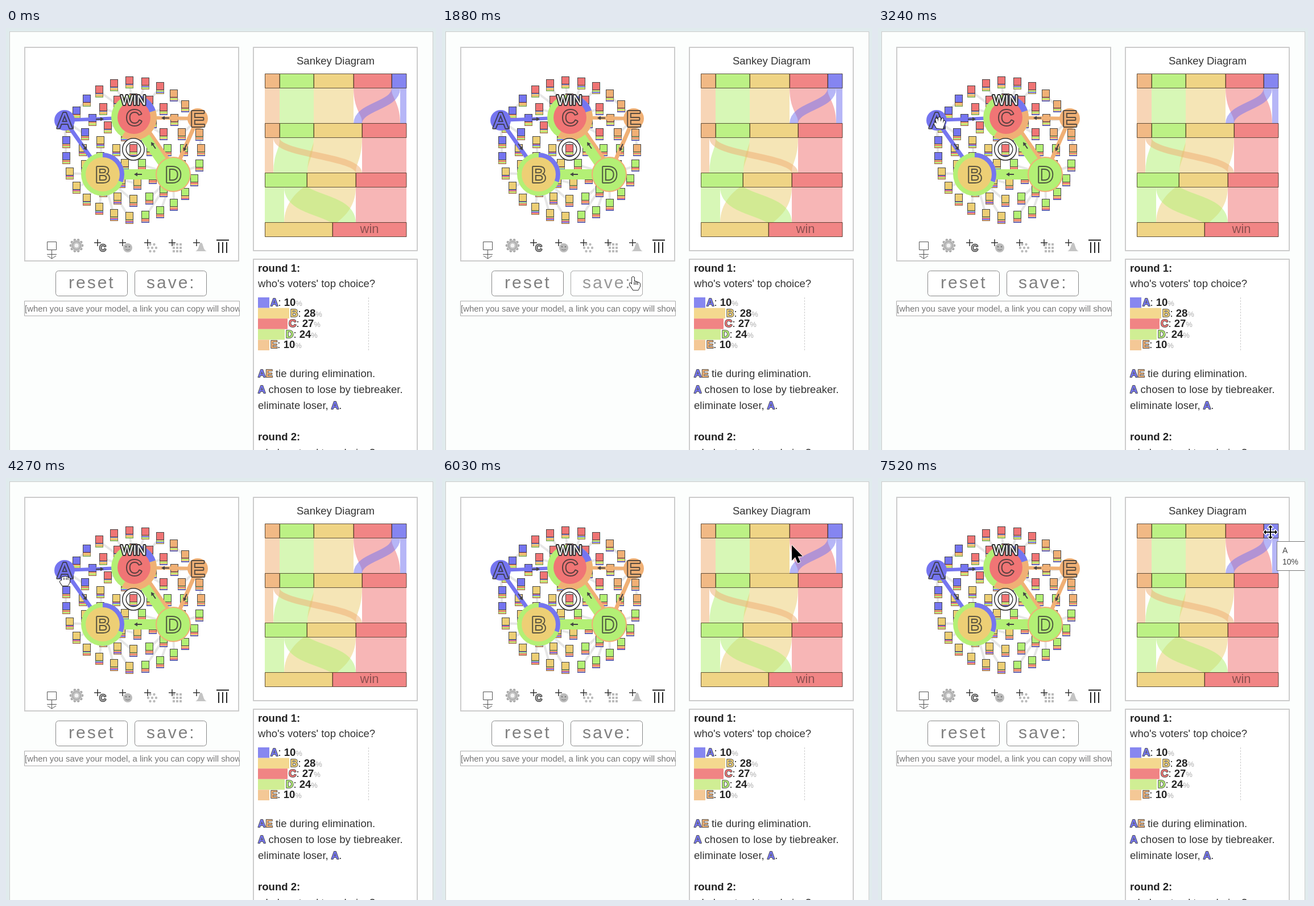
An HTML page with a canvas for the animation above (8000 ms loop, 756 px wide and 741 px high).

```html
<!DOCTYPE html>
<html lang="en">
<head>
<meta charset="utf-8">
<title>Ranked voting model</title>
<style>
html, body { margin: 0; width: 100%; height: 100%; overflow: hidden; background: #e0ebed; }
canvas { display: block; }
</style>
</head>
<body>
<canvas id="stage" width="756" height="741"></canvas>
<script>
const W = 756, H = 741, LOOP = 8000, TAU = Math.PI * 2;
const SANS = '"Liberation Sans", Arial, sans-serif';
const COLOR = { A: '#7575f0', B: '#edcf75', C: '#f07575', D: '#b3f075', E: '#f0b075' };
const BAR = { A: '#8787f0', B: '#f4d88f', C: '#f08484', D: '#d0ee94', E: '#f4c896' };
const PLACE = { A: [103, 162], B: [170, 257], C: [225, 157], D: [294, 257], E: [337, 159] };
const view = document.getElementById('stage').getContext('2d');
const backdrop = document.createElement('canvas');
backdrop.width = W;
backdrop.height = H;
let g = backdrop.getContext('2d');

function box(x, y, w, h, fill, stroke, line = 1) {
  if (fill) { g.fillStyle = fill; g.fillRect(x, y, w, h); }
  if (stroke) { g.strokeStyle = stroke; g.lineWidth = line; g.strokeRect(x, y, w, h); }
}

function disc(x, y, r, fill, from = 0, to = TAU) {
  g.fillStyle = fill;
  g.beginPath();
  if (to - from < TAU) g.moveTo(x, y);
  g.arc(x, y, r, from, to);
  g.fill();
}

function ring(x, y, r, color, line) {
  g.strokeStyle = color;
  g.lineWidth = line;
  g.beginPath();
  g.arc(x, y, r, 0, TAU);
  g.stroke();
}

function poly(points, color, line) {
  g.strokeStyle = color;
  g.lineWidth = line;
  g.beginPath();
  points.forEach(([x, y]) => g.lineTo(x, y));
  g.stroke();
}

function text(str, x, y, size, color = '#333', weight = '', align = 'left') {
  g.font = `${weight} ${size}px ${SANS}`;
  g.textAlign = align;
  g.fillStyle = color;
  g.fillText(str, x, y);
  return x + g.measureText(str).width;
}

function outlined(str, x, y, size, color, edge, line, weight = '', align = 'left') {
  g.font = `${weight} ${size}px ${SANS}`;
  g.textAlign = align;
  g.lineJoin = 'round';
  g.strokeStyle = edge;
  g.lineWidth = line;
  g.strokeText(str, x, y);
  return text(str, x, y, size, color, weight, align);
}

// ---------- election map ----------

function voters() {
  const list = [];
  [1, 6, 13, 20, 27].forEach((count, i) => {
    const r = i * 29.8;
    for (let k = 0; k < count; k++) {
      const a = k * TAU / count;
      list.push([224 + r * Math.cos(a), 214.5 + r * Math.sin(a)]);
    }
  });
  return list;
}

function ranking([x, y]) {
  const dist = id => Math.hypot(PLACE[id][0] - x, PLACE[id][1] - y);
  return Object.keys(PLACE).sort((a, b) => dist(a) - dist(b));
}

function ballot([x, y]) {
  const left = Math.round(x - 7), top = Math.round(y - 10.5);
  ranking([x, y]).forEach((id, i) => {
    if (i) box(left, top + 11 + i * 2, 14, 2, COLOR[id]);
    else box(left, top, 14, 13, COLOR[id]);
  });
  box(left + .5, top + .5, 13, 20, null, 'rgba(50,50,50,.5)');
  box(left + .5, top + .5, 13, 13, null, '#444');
}

function flow(from, to, color, line, shift = 0) {
  const [x1, y1] = PLACE[from], [x2, y2] = PLACE[to];
  const len = Math.hypot(x2 - x1, y2 - y1);
  const dx = -(y2 - y1) / len * shift, dy = (x2 - x1) / len * shift;
  poly([[x1 + dx, y1 + dy], [x2 + dx, y2 + dy]], color, line);
}

function arrow(x, y, from, to) {
  const [x1, y1] = PLACE[from], [x2, y2] = PLACE[to];
  g.save();
  g.translate(x, y);
  g.rotate(Math.atan2(y2 - y1, x2 - x1));
  poly([[-7, 0], [3, 0]], '#444', 2);
  g.fillStyle = '#444';
  g.beginPath();
  [[7, 0], [1, -3.5], [1, 3.5]].forEach(p => g.lineTo(...p));
  g.fill();
  g.restore();
}

function candidate(id, inner, outer, shares = []) {
  const [x, y] = PLACE[id];
  shares.forEach(([other, from, to]) => disc(x, y, outer, COLOR[other], from * TAU, to * TAU));
  disc(x, y, inner, COLOR[id]);
  outlined(id, x, y + 14, 39, COLOR[id], 'rgba(51,51,51,.8)', 4, '', 'center');
}

function map() {
  box(33, 34, 376, 375, '#fff', '#ccc', 2);
  const crowd = voters();
  crowd.forEach(v => poly([v, PLACE[ranking(v)[0]]], '#e6e6e6', 4));
  crowd.forEach(ballot);

  flow('A', 'C', COLOR.A, 6);
  flow('A', 'B', COLOR.A, 7);
  flow('E', 'C', COLOR.E, 6);
  flow('E', 'D', COLOR.E, 7);
  flow('D', 'B', COLOR.D, 18);
  flow('D', 'C', COLOR.D, 18, -3);
  flow('D', 'C', COLOR.E, 6, 8);
  arrow(165, 160, 'A', 'C');
  arrow(138, 209, 'A', 'B');
  arrow(280, 158, 'E', 'C');
  arrow(315, 210, 'E', 'D');
  arrow(232, 257, 'D', 'B');
  arrow(259, 206, 'D', 'C');

  candidate('A', 18, 18);
  candidate('B', 30, 38, [['D', 0, 1], ['A', -.25, .06]]);
  candidate('C', 29, 40, [['D', 0, 1], ['A', -.25, -.05], ['E', -.05, .34]]);
  candidate('D', 29, 31, [['E', 0, 1]]);
  candidate('E', 18, 18);
  outlined('WIN', 224, 135, 23, '#fff', '#333', 4, '', 'center');

  ring(224, 213, 16, '#333', 8);
  ring(224, 213, 16, '#fff', 5);
}

// ---------- toolbar ----------

function plus(x, y) {
  poly([[x - 6, y], [x + 6, y]], '#333', 1.5);
  poly([[x, y - 6], [x, y + 6]], '#333', 1.5);
}

function toolbar() {
  box(72.5, 375.5, 16, 14, null, '#555');
  poly([[80.5, 390], [80.5, 405]], '#555', 1);
  poly([[72, 397.5], [89, 397.5]], '#555', 1);
  poly([[73, 400], [80.5, 405], [88, 400]], '#555', 1);

  for (let i = 0; i < 10; i++) {
    const a = i * TAU / 10;
    disc(124 + 10 * Math.cos(a), 382 + 10 * Math.sin(a), 2.4, '#aaa');
  }
  disc(124, 382, 9.5, '#c4c4c4');
  ring(124, 382, 7, '#aaa', 1.5);
  disc(124, 382, 3.5, '#f4f4f4');

  [161, 205, 249, 292, 335].forEach(x => plus(x, 377));
  outlined('C', 170, 392, 16, '#aaa', '#444', 2.5, 'bold', 'center');

  disc(214, 386, 8, '#bbb');
  disc(211, 384, 1.2, '#777');
  disc(217, 384, 1.2, '#777');
  poly([[210, 389], [214, 390], [218, 389]], '#777', 1);

  disc(257, 386, 2.2, '#bbb');
  for (let i = 0; i < 6; i++) {
    disc(257 + 7 * Math.cos(i * TAU / 6), 386 + 7 * Math.sin(i * TAU / 6), 2.2, '#bbb');
  }
  for (let i = 0; i < 9; i++) {
    box(293 + i % 3 * 6, 378 + Math.floor(i / 3) * 6, 4, 4, '#bbb');
  }
  g.fillStyle = '#c4c4c4';
  g.beginPath();
  g.moveTo(333, 392);
  g.bezierCurveTo(340, 390, 339, 377, 343, 377);
  g.bezierCurveTo(347, 377, 346, 390, 353, 392);
  g.fill();

  poly([[370, 372.5], [392, 372.5]], '#222', 2);
  [374, 381, 388].forEach(x => poly([[x, 376], [x, 395]], '#222', 2));
}

function button(label, x, shade, edge = '#888') {
  g.fillStyle = '#fff';
  g.strokeStyle = edge;
  g.lineWidth = 1;
  g.beginPath();
  g.roundRect(x + .5, 426.5, 126, 44, 5);
  g.fill();
  g.stroke();
  g.letterSpacing = '3px';
  text(label, x + (label === 'reset' ? 23 : 21), 457, 30, shade);
  g.letterSpacing = '0px';
}

function controls() {
  toolbar();
  button('reset', 87, '#808080');
  button('save:', 226, '#808080');
  box(32.5, 479.5, 378, 26, '#fff', '#aaa');
  g.save();
  g.beginPath();
  g.rect(33, 480, 377, 25);
  g.clip();
  text('[when you save your model, a link you can copy will show', 33, 498, 14.9, '#757575');
  g.restore();
}

// ---------- Sankey diagram ----------

function link(id, row, from, to, width, alpha = .53) {
  const top = 106 + row * 87, end = top + 62, mid = top + 31;
  const a = from + width / 2, b = to + width / 2;
  g.globalAlpha = alpha;
  g.strokeStyle = COLOR[id];
  g.lineWidth = width;
  g.beginPath();
  g.moveTo(a, top);
  g.bezierCurveTo(a, mid, b, mid, b, end);
  g.stroke();
  g.globalAlpha = 1;
}

function sankey() {
  box(435, 34, 288, 357, '#fff', '#ccc', 2);
  text('Sankey Diagram', 579.5, 64, 18.56, '#333', '', 'center');
  link('E', 0, 455, 455, 26);
  link('D', 0, 481, 481, 60);
  link('B', 0, 541, 541, 70);
  link('C', 0, 611, 626, 67);
  link('A', 0, 678, 611, 15);
  link('A', 0, 693, 693, 11);
  link('E', 1, 455, 455, 15);
  link('D', 1, 481, 470, 60);
  link('B', 1, 541, 530, 85);
  link('C', 1, 626, 626, 78);
  link('E', 1, 470, 615, 11);
  link('D', 2, 455, 455, 34);
  link('B', 2, 530, 489, 85);
  link('C', 2, 615, 615, 89);
  link('D', 2, 489, 574, 41);

  const rows = [
    ['EDBCA', 455, 481, 541, 611, 678, 704],
    ['EDBC', 455, 481, 541, 626, 704],
    ['DBC', 455, 529, 615, 704],
    ['BC', 455, 574, 704]
  ];
  rows.forEach(([ids, ...edges], row) => [...ids].forEach((id, i) => {
    const x = edges[i], w = edges[i + 1] - x, y = 80.5 + row * 87;
    g.globalAlpha = .88;
    box(x, y, w, 25, COLOR[id]);
    g.globalAlpha = 1;
    box(x + .5, y, w - .5, 25, null, 'rgba(50,35,20,.75)');
  }));
  text('win', 639, 360, 22, '#8c5050', '', 'center');
}

// ---------- report ----------

function name(id, x, y) {
  return outlined(id, x, y, 18.56, COLOR[id], '#555', 2, 'bold');
}

function report() {
  const size = 18.56, left = 443;
  box(435, 406, 288, 400, '#fff', '#ccc', 2);
  text('round 1:', left, 428, size, '#222', 'bold');
  text("who's voters' top choice?", left, 455, size);

  const tally = [['A', 10, 20], ['B', 28, 55], ['C', 27, 52], ['D', 24, 47], ['E', 10, 20]];
  tally.forEach(([id, share, w], i) => {
    const y = 473 + i * 18.6;
    box(left, y, w, 18.6, BAR[id]);
    let x = name(id, left + w + 2, y + 15);
    x = text(': ', x, y + 15, size, '#222');
    x = text(share, x, y + 15, size, '#222', 'bold');
    text('%', x, y + 15, 13, '#aaa');
  });
  g.setLineDash([3, 2]);
  poly([[637.5, 473], [637.5, 566]], '#ccc', 1);
  g.setLineDash([]);

  let x = name('E', name('A', left, 613), 613);
  text(' tie during elimination.', x, 613, size);
  text(' chosen to lose by tiebreaker.', name('A', left, 641), 641, size);
  x = text('eliminate loser, ', left, 669, size);
  text('.', name('A', x, 669), 669, size);
  text('round 2:', left, 724, size, '#222', 'bold');
  text("who's voters' top choice?", left, 752, size);
}

// ---------- pointer ----------

const SHAPES = {
  arrow: 'M0 0V27L6 21L10.5 31.5L15 29.5L10.5 19.5H19Z',
  point: 'M-2 1Q0-1 2 1V8Q4 7 5 9Q7 8 8 10Q11 9 12 12V17L9 23H0L-6 14Q-7 10-4 11L-2 13Z',
  open: 'M-5 10L-9 3Q-10 0-7 0L-5 2L-7-6Q-5-9-3-6L-2-1V-8Q0-11 2-8V-1L4-7Q7-9 7-5L6 1L8-3Q10-4 10-1L7 8L6 11Z',
  fist: 'M-5 9L-9 3Q-10 0-6 0V-5Q-4-8-2-6Q0-9 2-6Q4-8 5-5Q8-6 8-3V3L5 9Z',
  move: 'M0-12L4-8H1V-1H8V-4L12 0L8 4V1H1V8H4L0 12L-4 8H-1V1H-8V4L-12 0L-8-4V-1H-1V-8H-4Z'
};
Object.keys(SHAPES).forEach(key => SHAPES[key] = new Path2D(SHAPES[key]));

// Each leg: shape, then time, x, y for every stop.
const PATH = [
  ['arrow', 1130, 243, 698, 1250, 272, 650, 1370, 300, 596, 1490, 321, 555, 1640, 333, 500],
  ['point', 1760, 336, 450, 1880, 336, 437],
  ['arrow', 2000, 325, 245, 2150, 260, 212, 2270, 190, 190, 2390, 145, 176],
  ['open', 2510, 118, 171, 2630, 113, 170, 2750, 111, 171, 2870, 110, 170, 2990, 108, 167, 3240, 108, 166],
  ['fist', 3760, 105, 160, 3880, 101, 151, 4000, 98, 145, 4150, 99, 155, 4270, 104, 180, 4390, 117, 205,
    4510, 126, 206, 4630, 103, 178, 4780, 104, 177, 4900, 112, 175, 5020, 121, 174],
  ['open', 5270, 119, 175], ['fist', 5390, 120, 174],
  ['open', 5640, 120, 175],
  ['arrow', 5760, 361, 173, 5910, 500, 145, 6030, 615, 118, 6150, 640, 112, 6270, 655, 109],
  ['move', 6390, 670, 106, 6510, 678, 105, 6630, 684, 104, 6780, 686, 100, 6900, 689, 97, 7020, 690, 95]
];
const STOPS = PATH.flatMap(([shape, ...n]) =>
  Array.from({ length: n.length / 3 }, (_, i) => [shape, ...n.slice(i * 3, i * 3 + 3)]));

function pointer(t) {
  const stop = STOPS.filter(s => s[1] <= t).pop();
  if (!stop) return;
  const [shape, , x, y] = stop;
  const dark = shape === 'arrow' || shape === 'move';
  g.save();
  g.translate(x, y);
  g.lineJoin = 'round';
  g.lineWidth = shape === 'move' ? 3 : 1.6;
  g.strokeStyle = dark ? '#fff' : '#000';
  g.fillStyle = dark ? '#000' : '#fff';
  g.stroke(SHAPES[shape]);
  g.fill(SHAPES[shape]);
  if (shape === 'point') [2, 5, 8].forEach(k => poly([[k, 9], [k, 14]], '#000', 1));
  if (shape === 'fist') [-2, 2, 5].forEach(k => poly([[k, -5], [k, -1]], '#000', 1));
  g.restore();
}

function tooltip() {
  g.save();
  g.beginPath();
  g.rect(0, 0, 750, H);
  g.clip();
  box(701.5, 111.5, 60, 51, '#fff', '#777');
  text('A', 711, 132, 14, '#444');
  text('10%', 711, 152, 14, '#444');
  g.restore();
}

box(0, 0, W, H, '#e0ebed');
box(6.5, 6.5, 744, 800, '#fcfefd', '#ccc');
map();
controls();
sankey();
report();
g = view;

function frame(now) {
  const t = now % LOOP;
  const during = (from, to) => t >= from && t < to;
  g.drawImage(backdrop, 0, 0);
  if (during(1760, 2000)) button('save:', 226, '#999', '#aaa');
  if (during(5910, 6150)) link('B', 0, 541, 541, 70, .42);
  if (during(6150, 6390)) link('C', 0, 611, 626, 67, .42);
  if (during(7520, LOOP)) tooltip();
  pointer(t);
  requestAnimationFrame(frame);
}
requestAnimationFrame(frame);
</script>
</body>
</html>
```
